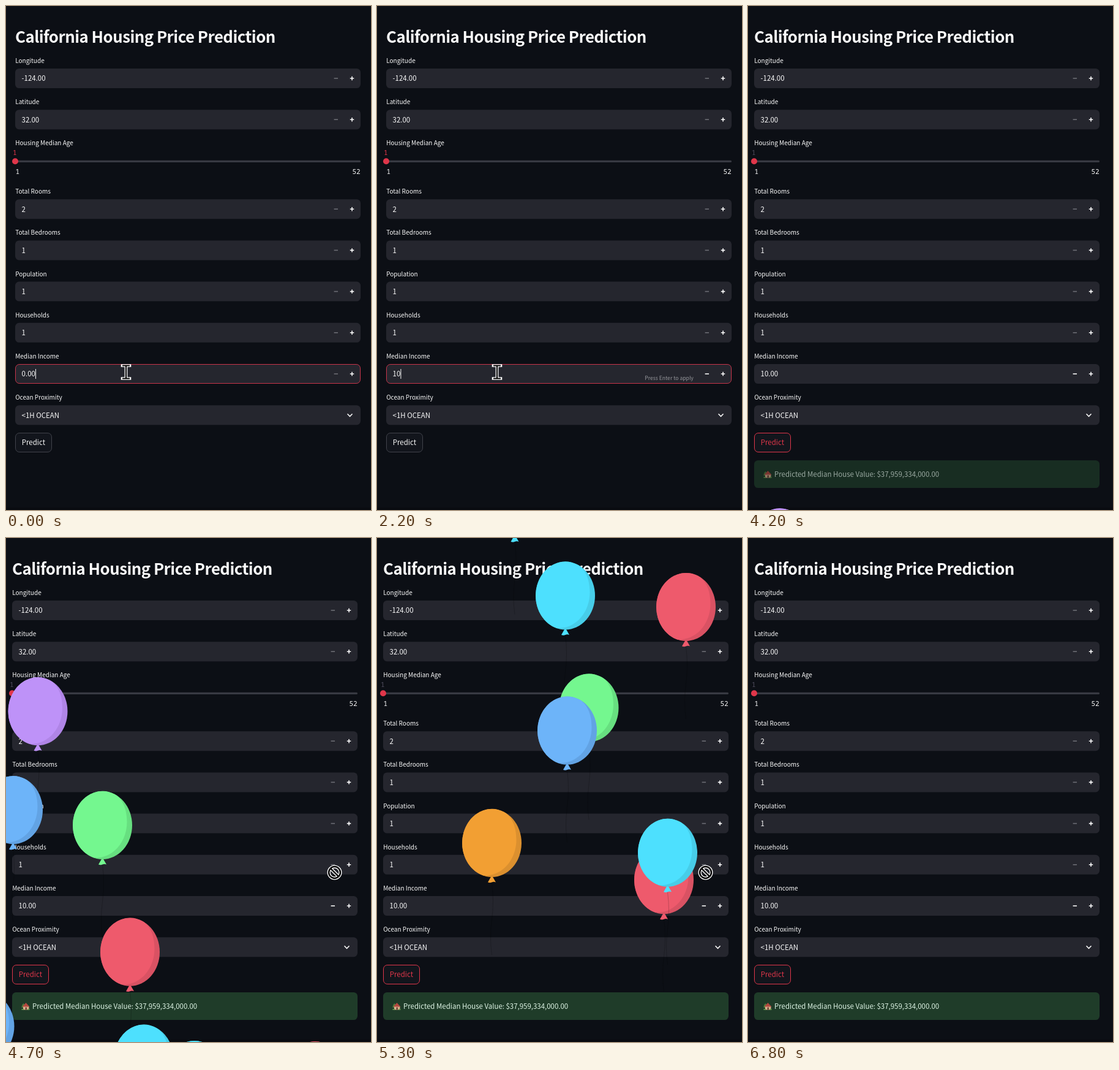
Write an HTML page that moves like this. It is 596 by 822 pixels and loops after 6900 ms.

```html
<!DOCTYPE html>
<html lang="en">
<head>
<meta charset="utf-8">
<title>Housing price form</title>
<style>
  html, body { margin: 0; width: 100%; height: 100%; overflow: hidden; background: #0c0f15; }
  svg { display: block; width: 596px; height: 822px; }
  text {
    font-family: "Noto Sans CJK JP", "Noto Sans CJK SC", "Noto Sans CJK", "Noto Sans", sans-serif;
    fill: #fafafa; white-space: pre;
  }
  .title { font-size: 25.8px; font-weight: 600; letter-spacing: -.52px; }
  .label { font-size: 10.03px; }
  .value { font-size: 11.46px; }
  .hint { font-size: 8.6px; fill: #95969b; }
  .tick { font-family: "Noto Sans Mono", "DejaVu Sans Mono", monospace; font-size: 11px; }
  .sign { fill: none; stroke-width: 1.6; }
</style>
</head>
<body>
<svg id="stage" viewBox="0 0 596 822"></svg>
<script>
const LOOP = 6900, STEP = 100;
const WHITE = '#fafafa', DIM = '#6c6d74', RED = '#e0364a', FIELD = '#25262e';
const SHOW_RESULT = 4100, COMMIT = 3500, CLEARED = 700;
const RISE = 750, TRAVEL = 1062, STAGE_H = 822;

const stage = document.getElementById('stage');

function add(parent, tag, attrs = {}, content) {
  const node = document.createElementNS('http://www.w3.org/2000/svg', tag);
  set(node, attrs);
  if (content !== undefined) node.textContent = content;
  parent.appendChild(node);
  return node;
}
function set(node, attrs) {
  for (const key in attrs) node.setAttribute(key, attrs[key]);
}
const show = (node, on) => node.setAttribute('visibility', on ? 'visible' : 'hidden');
const write = (parent, cls, x, y, content, more) =>
  add(parent, 'text', { class: cls, x, y, ...more }, content);
const box = (parent, x, y, width, height, fill, more) =>
  add(parent, 'rect', { x, y, width, height, rx: 6.4, fill, ...more });
const clamp = v => Math.max(0, Math.min(1, v));

// ---- form ----
add(stage, 'rect', { width: 596, height: 822, fill: '#0c0f15' });
add(stage, 'rect', { y: 818, width: 596, height: 4, fill: '#090b10' });
const form = add(stage, 'g');
write(form, 'title', 15, 60, 'California Housing Price Prediction');

function field(name, y, content) {
  write(form, 'label', 15.2, y - 9, name);
  const frame = box(form, 15, y, 564, 32, FIELD);
  const value = write(form, 'value', 25.6, y + 20.3, content);
  return { frame, value, y };
}
function numberField(name, y, content) {
  const part = field(name, y, content);
  const sign = (d, stroke) => add(form, 'path', { class: 'sign', d, stroke });
  part.minus = sign(`M535.6 ${y + 16}h6.4`, DIM);
  part.plus = sign(`M561.8 ${y + 16}h6.4m-3.2-3.2v6.4`, WHITE);
  return part;
}

numberField('Longitude', 102, '-124.00');
numberField('Latitude', 169.2, '32.00');

write(form, 'label', 15.2, 227.2, 'Housing Median Age');
add(form, 'rect', { x: 15, y: 251.8, width: 564, height: 3.2, rx: 1.6, fill: '#383a42' });
add(form, 'circle', { cx: 15, cy: 253.3, r: 5, fill: RED });
const age = write(form, 'tick', 14.2, 243, '1', { 'text-anchor': 'middle' });
write(form, 'tick', 15.4, 274, '1');
write(form, 'tick', 578.6, 274, '52', { 'text-anchor': 'end' });

numberField('Total Rooms', 315.2, '2');
numberField('Total Bedrooms', 382.4, '1');
numberField('Population', 449.6, '1');
numberField('Households', 516.8, '1');
const income = numberField('Median Income', 584, '');
const hint = write(form, 'hint', 437.3, 610, 'Press Enter to apply');
const caret = add(form, 'rect', { y: 592, width: 1, height: 16, fill: WHITE });
field('Ocean Proximity', 651.2, '<1H OCEAN');
add(form, 'path', { d: 'M557.5 665.3l4 4 4-4', fill: 'none', stroke: WHITE, 'stroke-width': 1.6 });

const button = box(form, 15.5, 696.5, 59, 31, '#12151c');
const buttonText = write(form, 'value', 25.8, 716.3, 'Predict');

const result = add(stage, 'g');
box(result, 10, 741, 564, 45, '#1f3c29');
const house = [
  ['M25.5 766q0-5 3-7 3 2 3 7z', '#4f7d3c'],
  ['M28 764h9.5v5.5h-9.5z', '#d9b08c'],
  ['M26.5 764.5l6-6.5 6 6.5z', '#b5483f'],
  ['M31.5 765.5h2.5v4h-2.5z', '#6d4535'],
  ['M25.5 768h3.5v1.8h-3.5zM35.5 768h3v1.8h-3z', '#5f9a48']
];
house.forEach(([d, fill]) => add(result, 'path', { d, fill }));
write(result, 'value', 43, 768.2, 'Predicted Median House Value: $37,959,334,000.00', { style: 'fill:#dff5e6' });

// ---- balloons ----
const TINT = {
  purple: ['#be92f8', '#b085e6'], blue: ['#6db4f9', '#62a3e4'], green: ['#74f78f', '#67df80'],
  red: ['#ee5a6c', '#d95263'], cyan: ['#4de0fe', '#47cde8'], orange: ['#f29f33', '#db902f']
};
// colour, centre x, launch time
const balloons = [
  ['purple', 52, 4172], ['blue', 11.5, 4263], ['green', 157.5, 4278], ['red', 202.5, 4420],
  ['blue', -35, 4532], ['cyan', 225, 4605], ['cyan', 307.5, 4676], ['red', 504.5, 4685],
  ['green', 346, 4769], ['blue', 310.5, 4789], ['orange', 187.5, 4896],
  ['red', 468.5, 4935], ['cyan', 474.5, 4906]
].map(([tint, x, start]) => {
  const [light, dark] = TINT[tint];
  const node = add(stage, 'g');
  add(node, 'path', { d: 'M0 120q4 30 0 60t0 58', fill: 'none', stroke: '#000', 'stroke-opacity': .2 });
  add(node, 'path', { d: 'M0 108l6.5 11.5q-3.5-1.5-6.5 0t-6.5 0z', fill: light });
  add(node, 'ellipse', { cy: 55.5, rx: 48.5, ry: 55.5, fill: dark });
  add(node, 'path', {
    d: 'M-14 2.4A48.5 55.5 0 0 0-14 108.6C18 110 40 82 40 50C40 28 32 12 21 5.5A48.5 55.5 0 0 0-14 2.4z',
    fill: light
  });
  return { node, x, start };
});

// cubic-bezier(.42, 0, 1, 1)
function easeIn(p) {
  let lo = 0, hi = 1;
  for (let i = 0; i < 24; i++) {
    const u = (lo + hi) / 2, v = 1 - u;
    if (1.26 * u * v * v + 3 * u * u * v + u * u * u < p) lo = u; else hi = u;
  }
  return lo * lo * (3 - 2 * lo);
}

// ---- pointers ----
function pointer(d, closed) {
  const node = add(stage, 'g', { 'stroke-linejoin': 'round' });
  if (closed) add(node, 'path', { d, fill: '#000', stroke: '#fff', 'stroke-width': 1.5 });
  else {
    add(node, 'path', { d, fill: 'none', stroke: '#fff', 'stroke-width': 4.6, 'stroke-linecap': 'square' });
    add(node, 'path', { d, fill: 'none', stroke: '#000', 'stroke-width': 2 });
  }
  return node;
}
const beam = pointer('M-6-10.5H6M0-10.5V10.5M-6 10.5H6');
const hand = pointer('M-3 18V2a2.5 2.5 0 0 1 5 0V12q2.5-2.5 4.5.5 2.5-2 4.5.8 3.5-1 3.5 3v5q0 4-3 8v2H-1' +
  'q-2-5-5-7.5-4-4-4.5-6 1.5-3.5 5.5 0z', true);
const blocked = add(stage, 'g', { transform: 'translate(536.5 545.5)', fill: 'none' });
[['#fff', 5.2], ['#000', 2.5]].forEach(([stroke, width]) =>
  add(blocked, 'path', {
    d: 'M-9.4 0a9.4 9.4 0 1 0 18.8 0a9.4 9.4 0 1 0-18.8 0M-6.4-6.4L6.4 6.4', stroke, 'stroke-width': width
  }));

// ---- timeline ----
const entries = [[0, '0.00'], [CLEARED, ''], [1600, '1'], [1900, '10'], [COMMIT, '10.00']];

function drawIncome(t) {
  const [since, content] = entries.filter(e => e[0] <= t).pop();
  const focused = t < COMMIT, editing = focused && t >= CLEARED;
  const phase = since ? t - since : t + 200;
  income.value.textContent = content;
  set(income.frame, focused
    ? { x: 15.5, y: 584.5, width: 563, height: 31, stroke: '#c8344a' }
    : { x: 15, y: 584, width: 564, height: 32, stroke: 'none' });
  set(income.minus, { stroke: t >= 1600 ? WHITE : DIM });
  set(income.plus, { stroke: editing && !content ? DIM : WHITE });
  show(hint, editing);
  show(caret, focused && phase % 1000 < 500);
  const digits = content.replace('.', '').length;
  set(caret, { x: 25.7 + digits * 6.36 + (content.includes('.') ? 3.2 : 0) });
}

function drawPointer(t) {
  const p = clamp((t - 2600) / 400), k = p * p * (3 - 2 * p);
  const x = 196 - 129 * k, y = 597 + 125 * k;
  const onHand = y > 651;
  const at = { transform: `translate(${x} ${y})` };
  set(beam, at);
  set(hand, at);
  show(beam, t < 3800 && !onHand);
  show(hand, t < 3800 && onHand);
  show(blocked, t >= 4500 && t < 6100);
}

function draw(t) {
  const done = t >= SHOW_RESULT, hot = t >= 3000;
  set(form, { transform: `translate(${done ? -5 : 0} 0)` });
  age.style.fill = done ? '#4e4c5c' : RED;
  set(button, { stroke: hot ? RED : '#41434b' });
  buttonText.style.fill = hot ? RED : WHITE;
  show(result, done);
  set(result, { opacity: clamp((t - 4000) / 300) });
  drawIncome(t);
  drawPointer(t);
  for (const { node, x, start } of balloons) {
    const p = (t - start) / RISE;
    const active = p > 0 && p < 1;
    node.setAttribute('display', active ? 'inline' : 'none');
    if (active) set(node, { transform: `translate(${x} ${STAGE_H - TRAVEL * easeIn(p)})` });
  }
}

const origin = performance.now();
function tick() {
  const t = (performance.now() - origin) % LOOP;
  draw(Math.floor(t / STEP) * STEP);
  requestAnimationFrame(tick);
}
draw(0);
requestAnimationFrame(tick);
</script>
</body>
</html>
```
